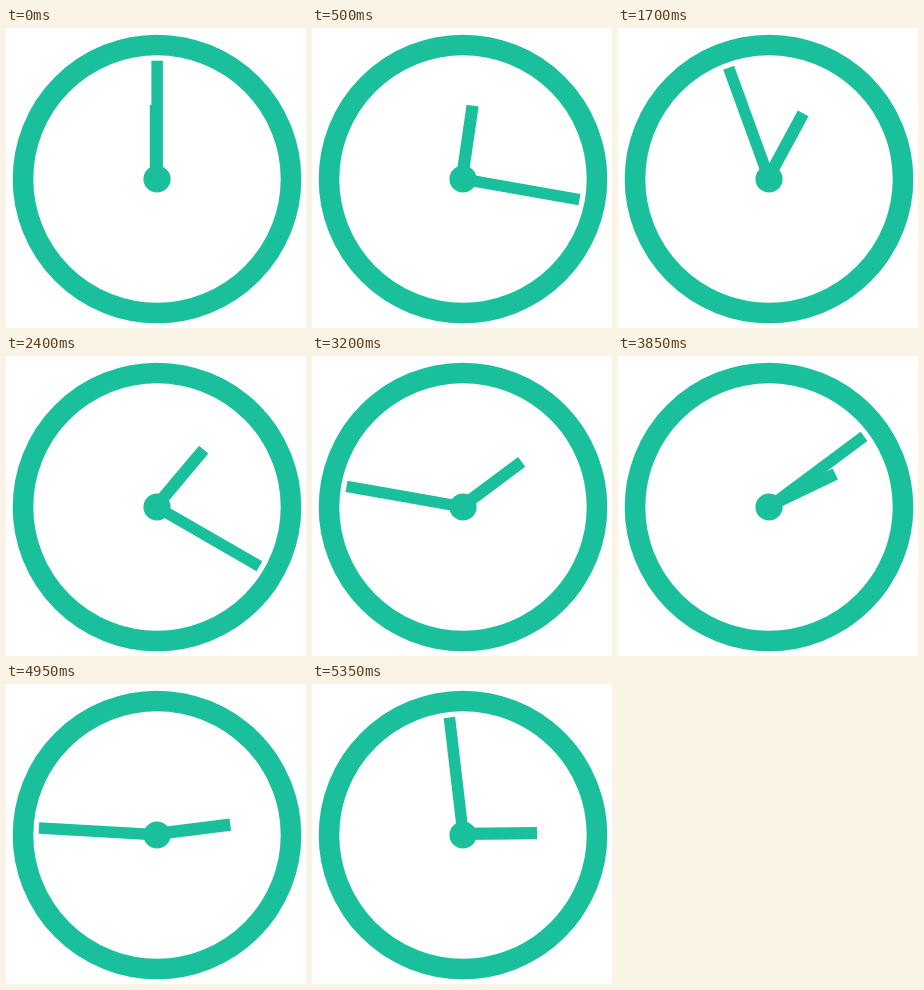
Recreate the animation shown at these times as an HTML page. Size 300 px wide and 300 px high, loop 5.4 s.

```html
<!DOCTYPE html>
<html lang="en">
<head>
<meta charset="utf-8">
<title>Clock</title>
<style>
  html, body { margin: 0; width: 100%; height: 100%; overflow: hidden; background: #fff; }
  svg { display: block; width: 100%; height: 100%; }
</style>
</head>
<body>
<svg viewBox="0 0 300 300">
  <g transform="translate(151 151)" fill="#1abf9c">
    <circle r="134" fill="none" stroke="#1abf9c" stroke-width="20.6"/>
    <rect id="hour" x="-7.2" y="-74" width="12.2" height="74"/>
    <rect id="minute" x="-5.6" y="-118.3" width="11.5" height="118.3"/>
    <circle r="13.6"/>
  </g>
</svg>
<script>
  const LOOP = 5400;
  const FRAME = 50;
  const TICK_DEGREES = 20 / 3; // minute hand turn per 1/30 s tick
  const hour = document.getElementById('hour');
  const minute = document.getElementById('minute');

  const turn = (hand, degrees) => hand.setAttribute('transform', `rotate(${degrees})`);

  function draw(time) {
    const frame = Math.floor((time % LOOP) / FRAME);
    const tick = Math.round(frame * 1.5); // 30 ticks shown at 20 frames per second
    turn(minute, tick * TICK_DEGREES);
    turn(hour, tick * TICK_DEGREES / 12);
  }

  const start = performance.now();
  function loop() {
    draw(performance.now() - start);
    requestAnimationFrame(loop);
  }
  loop();
</script>
</body>
</html>
```
